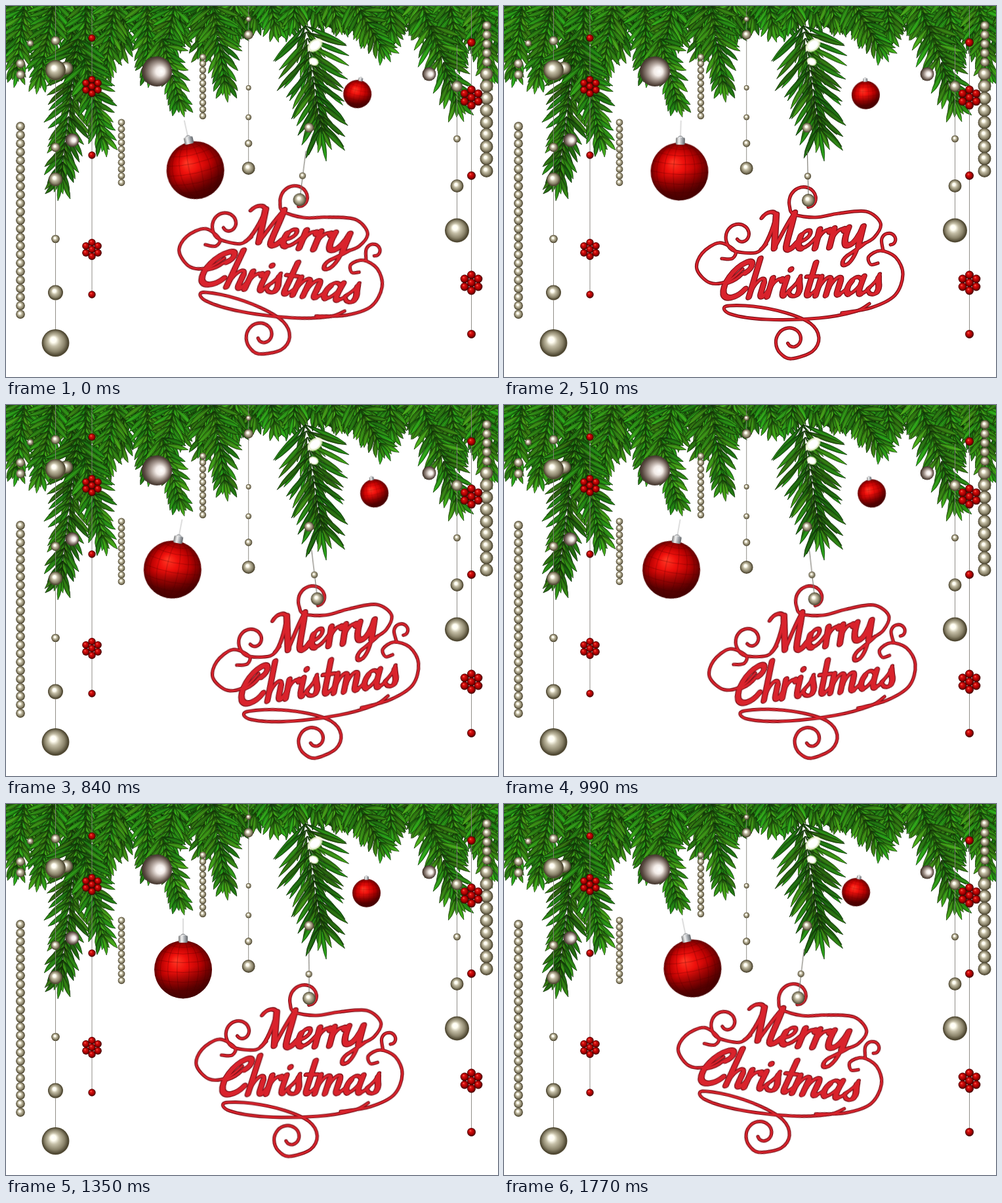
An HTML page with a canvas for the animation above (1800 ms loop, 750 by 567 pixels).

```html
<!DOCTYPE html>
<html lang="en">
<head>
<meta charset="utf-8">
<title>Merry Christmas</title>
<style>
html, body { margin: 0; width: 100%; height: 100%; overflow: hidden; background: #fff; }
canvas, svg { position: absolute; left: 0; top: 0; width: 750px; height: 567px; }

/* Each half of the swing advances in 30 ms steps */
.swing { animation: swing 1800ms steps(30) infinite; }
@keyframes swing {
  0%, 100% { transform: rotate(var(--from)); }
  50% { transform: rotate(var(--to)); }
}
#sign { --from: 8.5deg; --to: -6.5deg; transform-origin: 461.3px 186px; }
#bigBall { --from: -12.5deg; --to: 12.5deg; transform-origin: 270px 167px; }
#smallBall { --from: 12.5deg; --to: -12.5deg; transform-origin: 549.5px 72px; }

#lettering path { fill: none; stroke-linecap: round; stroke-linejoin: round; }
.curl { stroke-width: calc(2.8px + var(--edge)); }
.bold { stroke-width: calc(7px + var(--edge)); }
.thin { stroke-width: calc(4px + var(--edge)); }
.outline { --edge: 2.4px; stroke: #7d0e16; }
.face { --edge: 0px; stroke: #d9232c; }
</style>
</head>
<body>
<canvas id="fir" width="750" height="567"></canvas>
<svg viewBox="0 0 750 567" role="img" aria-label="Merry Christmas">
  <defs>
    <radialGradient id="pearl" cx=".5" cy=".5" r=".52" fx=".4" fy=".36">
      <stop offset="0" stop-color="#fff"/>
      <stop offset=".2" stop-color="#fffdf0"/>
      <stop offset=".4" stop-color="#c4bea6"/>
      <stop offset=".7" stop-color="#8a836a"/>
      <stop offset=".92" stop-color="#4a432e"/>
      <stop offset="1" stop-color="#766f57"/>
    </radialGradient>
    <radialGradient id="rose" cx=".5" cy=".5" r=".52" fx=".66" fy=".5">
      <stop offset="0" stop-color="#fff"/>
      <stop offset=".28" stop-color="#f3ece8"/>
      <stop offset=".55" stop-color="#a89a92"/>
      <stop offset=".85" stop-color="#57483f"/>
      <stop offset="1" stop-color="#3b2e27"/>
    </radialGradient>
    <radialGradient id="berry" cx=".5" cy=".5" r=".52" fx=".36" fy=".32">
      <stop offset="0" stop-color="#ff7660"/>
      <stop offset=".25" stop-color="#dc1010"/>
      <stop offset=".65" stop-color="#a20000"/>
      <stop offset="1" stop-color="#2c0000"/>
    </radialGradient>
    <radialGradient id="bauble" cx=".5" cy=".5" r=".52" fx=".38" fy=".34">
      <stop offset="0" stop-color="#ff3a26"/>
      <stop offset=".3" stop-color="#ee100c"/>
      <stop offset=".65" stop-color="#bb0202"/>
      <stop offset="1" stop-color="#5e0000"/>
    </radialGradient>
    <linearGradient id="dusk" x1=".35" y1="0" x2=".6" y2="1">
      <stop offset=".5" stop-color="#300" stop-opacity="0"/>
      <stop offset=".85" stop-color="#300" stop-opacity=".65"/>
    </linearGradient>
    <linearGradient id="cap">
      <stop offset="0" stop-color="#777"/>
      <stop offset=".35" stop-color="#f4f4f4"/>
      <stop offset=".65" stop-color="#a9adb2"/>
      <stop offset="1" stop-color="#63666a"/>
    </linearGradient>
    <radialGradient id="glow">
      <stop offset=".55" stop-color="#fff"/>
      <stop offset=".8" stop-color="#f6fbd8" stop-opacity=".85"/>
      <stop offset="1" stop-color="#dff0a8" stop-opacity="0"/>
    </radialGradient>
    <g id="ball">
      <path d="M-4 -50a4 4 0 1 1 8 0" fill="none" stroke="#9a9da0" stroke-width="1.5"/>
      <circle r="44" fill="url(#bauble)"/>
      <g id="facets" fill="none" stroke="#500" stroke-opacity=".35"></g>
      <circle r="44" fill="url(#dusk)"/>
      <rect x="-7" y="-52" width="14" height="11" rx="2" fill="url(#cap)"/>
    </g>
    <g id="lettering"></g>
  </defs>

  <g id="strings" stroke="#85837c" stroke-width=".9"></g>
  <g id="beads"></g>
  <ellipse cx="471" cy="60" rx="14" ry="9.5" transform="rotate(-38 471 60)" fill="url(#glow)"/>
  <ellipse cx="469" cy="85" rx="8.5" ry="6.5" transform="rotate(25 469 85)" fill="url(#glow)"/>

  <g id="bigBall" class="swing">
    <path d="M270 175V201" stroke="#bbb"/>
    <use href="#ball" x="270" y="253"/>
  </g>
  <g id="smallBall" class="swing">
    <use href="#ball" transform="translate(549.5 136) scale(.488)"/>
  </g>
  <g id="sign" class="swing">
    <use href="#lettering" class="outline"/>
    <use href="#lettering" class="face"/>
    <path d="M462.4 222L464 290" stroke="#77756c" stroke-width="1.1"/>
    <circle cx="463" cy="260" r="5.2" fill="url(#pearl)"/>
    <circle cx="464" cy="297" r="10" fill="url(#pearl)"/>
  </g>
</svg>
<script>
const svgNS = 'http://www.w3.org/2000/svg';
const byId = id => document.getElementById(id);
const rad = deg => deg * Math.PI / 180;

function add(parent, tag, attrs) {
  const el = document.createElementNS(svgNS, tag);
  for (const key in attrs) el.setAttribute(key, attrs[key]);
  parent.append(el);
  return el;
}

// --- Fir: seeded random numbers keep the branches identical on every load
let seed = 77;
function rand() {
  seed = (seed * 1664525 + 1013904223) >>> 0;
  return seed / 4294967296;
}
const spread = n => (rand() - .5) * 2 * n;
const ctx = byId('fir').getContext('2d');

function needle(x, y, angle, len, width, light) {
  const hue = 106 + spread(7);
  const tone = k => `hsl(${hue} 73% ${Math.round(light * k)}%)`;
  const bend = spread(3);
  ctx.save();
  ctx.translate(x, y);
  ctx.rotate(angle);
  const shade = ctx.createLinearGradient(0, 0, len, 0);
  shade.addColorStop(0, tone(.5));
  shade.addColorStop(.45, tone(.95));
  shade.addColorStop(1, tone(1.15));
  ctx.fillStyle = shade;
  ctx.strokeStyle = tone(.42);
  ctx.lineWidth = .7;
  ctx.beginPath();
  ctx.moveTo(0, 0);
  ctx.quadraticCurveTo(len * .6, bend - width, len, 0);
  ctx.quadraticCurveTo(len * .6, bend + width, 0, 0);
  ctx.fill();
  ctx.stroke();
  ctx.strokeStyle = tone(1.45);
  ctx.beginPath();
  ctx.moveTo(len * .2, 0);
  ctx.quadraticCurveTo(len * .6, bend, len * .95, 0);
  ctx.stroke();
  ctx.restore();
}

function branch(x0, y0, x1, y1, len, light) {
  const dir = Math.atan2(y1 - y0, x1 - x0);
  const rows = Math.ceil(Math.hypot(x1 - x0, y1 - y0) / 10);
  for (let i = 0; i <= rows; i++) {
    const t = i / rows;
    const x = x0 + (x1 - x0) * t, y = y0 + (y1 - y0) * t;
    for (const side of [-1, 1]) {
      const open = 1 - .5 * t + spread(.15);
      const size = len * (1.1 - .35 * t) * (.9 + rand() * .2);
      needle(x, y, dir + side * open, size, 7, light + spread(5));
      needle(x, y, dir + side * open * .45, size * .75, 6, light + 2 + spread(5));
    }
  }
  needle(x1, y1, dir, len * .8, 6, light + 4);
}

// Fringe along the top: deep at both ends, shallow around x = 475
const fringe = x => Math.min(98, 22 + 75 * ((x - 475) / 260) ** 2);
for (const [depth, step, light] of [[.3, 30, 18], [.65, 40, 25], [1, 46, 29]])
  for (let x = -15; x < 780; x += step)
    branch(x, -25, x + (x - 400) * .05 + spread(12), fringe(x) * depth + spread(9), 40, light);

// Boughs that hang below the fringe
branch(110, 50, 84, 258, 50, 25);
branch(120, 80, 146, 198, 42, 29);
branch(238, 50, 264, 142, 36, 28);
branch(316, 0, 333, 114, 42, 28);
branch(456, 30, 480, 185, 66, 26);
branch(530, -10, 570, 58, 40, 28);
branch(648, 30, 686, 142, 46, 29);

// --- Bead strings
const bead = (cx, cy, r, kind = 'pearl') =>
  add(byId('beads'), 'circle', { cx, cy, r, fill: `url(#${kind})` });
const string = (x, y1, y2) => add(byId('strings'), 'line', { x1: x, y1, x2: x, y2 });

function strand(x, top, bottom, gap, r) {
  for (let y = top; y <= bottom; y += gap) bead(x, y, r);
}
function hang(x, top, pearls) {
  const ys = Object.keys(pearls).map(Number);
  string(x, top, Math.max(...ys));
  for (const y of ys) bead(x, y, pearls[y]);
}
function flower(x, y, r) {
  for (let a = 90; a < 450; a += 60)
    bead(x + Math.cos(rad(a)) * r * 1.85, y + Math.sin(rad(a)) * r * 1.85, r, 'berry');
  bead(x, y, r, 'berry');
}
function redString(x, scale) {
  const r = 5.7 * scale;
  string(x, 0, 441 * scale);
  for (const y of [49, 228, 441]) bead(x, y * scale, r, 'berry');
  for (const y of [123, 372]) flower(x, y * scale, r);
}

strand(22, 184, 472, 13.05, 6.9);
strand(22, 88, 106, 17, 7);
strand(300, 78, 170, 10, 5.2);
strand(176, 178, 271, 10.2, 5.4);
strand(733, 30, 90, 14, 7);
strand(732.5, 104, 253, 18.5, 10);
bead(92, 95, 10);
bead(37, 57, 5);
bead(462, 186, 7.5);
hang(75.5, 0, { 53: 7, 98: 15.5, 216: 7, 265: 10.5, 356: 6.3, 438: 11.5, 515: 21 });
hang(369.7, 0, { 20: 4, 44: 7.2, 125: 4, 170: 4.5, 210: 5.7, 248: 10 });
hang(687.5, 60, { 123: 8.5, 203: 5.5, 275: 10, 343: 18.5 });
bead(230, 100, 23, 'rose');
bead(101, 205, 10.5, 'rose');
bead(645, 104, 10.5, 'rose');
redString(131, 1);
redString(709.5, 1.137);

// --- Bauble facets: meridians and sagging parallels
for (let a = 12; a < 90; a += 20)
  add(byId('facets'), 'ellipse', { rx: 44 * Math.sin(rad(a)), ry: 44 });
for (let a = -60; a <= 60; a += 20) {
  const x = 44 * Math.cos(rad(a)), y = 44 * Math.sin(rad(a));
  add(byId('facets'), 'path', { d: `M${-x} ${y}Q0 ${y + 9} ${x} ${y}` });
}

// --- Lettering
const ink = byId('lettering');

// Smooth curve through key points
function smooth(points) {
  const at = i => points[Math.max(0, Math.min(points.length - 1, i))];
  let d = 'M' + points[0];
  for (let i = 0; i < points.length - 1; i++) {
    const [p, a, b, n] = [at(i - 1), at(i), at(i + 1), at(i + 2)];
    const c1 = a.map((v, k) => v + (b[k] - p[k]) / 6);
    const c2 = b.map((v, k) => v - (n[k] - a[k]) / 6);
    d += `C${c1} ${c2} ${b}`;
  }
  return d;
}
// Opens anticlockwise from radius r0 to r1
function spiral(cx, cy, r0, r1, from, to) {
  const n = 10;
  return Array.from({ length: n + 1 }, (_, i) => {
    const a = rad(from + (to - from) * i / n), r = r0 + (r1 - r0) * i / n;
    return [cx + r * Math.cos(a), cy + r * Math.sin(a)];
  });
}
const swash = (...points) => add(ink, 'path', { class: 'curl', d: smooth(points) });

swash(...spiral(460, 297, 11, 28, 70, -230), [475, 323], [510, 317], [552, 314], [574, 332], [564, 354], [543, 366]);
swash(...spiral(360, 351, 7, 25, 130, -250), [384, 377], [400, 364]);
swash([332, 386], [348, 386], [352, 374], [328, 362], [302, 378], [294, 402], [314, 423], [342, 420], [364, 402]);
swash(...spiral(588, 358, 7, 13, 80, -200), [578, 374]);
swash([570, 393], [559, 395], [556, 383], [574, 374], [597, 384], [608, 410], [596, 442], [560, 461], [515, 469]);
swash(...spiral(438, 511, 7, 28, 140, -270), [470, 528], [480, 507], [467, 485], [430, 469], [380, 459],
  [338, 459], [346, 471], [400, 479], [480, 477], [535, 467], [557, 455]);

// Letters stand on y = 0 with an x-height of 28; w is the advance
const hump = x => `M${x} -8c2 -12 8 -20 13 -18c4 2 3 10 3 16`;
const glyphs = {
  M: { w: 48, bold: 'M9 -53L18 -4M34 -54C35 -36 33 -16 34 -6C35 1 41 2 48 -10',
       thin: 'M-10 -50C-6 -59 4 -60 9 -53C10 -34 6 -10 0 -4M18 -4C24 -24 28 -42 34 -54' },
  e: { w: 25, bold: 'M3 -20C1 -10 2 -2 8 -1',
       thin: 'M0 -10C12 -12 18 -20 14 -26C8 -30 1 -20 2 -10C3 3 14 2 25 -16' },
  r: { w: 20, bold: 'M2 -27V0M16 -25l1 2', thin: 'M3 -12C5 -22 11 -28 17 -24' },
  y: { w: 30, bold: 'M2 -27C0 -14 0 0 8 -1C15 -2 21 -16 22 -27L22 0',
       thin: 'M22 -8C22 8 20 20 14 26C6 32 2 22 10 14C18 8 24 4 30 -2' },
  C: { w: 0, bold: 'M-10 -36C0 -42 -2 -56 -13 -51C-30 -43 -39 -20 -33 -6C-28 4 -12 2 -3 -12',
       thin: 'M-30 -22C-24 -24 -18 -28 -14 -34' },
  h: { w: 31, bold: 'M6 -56V0M22 -20V-6C22 -1 24 0 26 -1', thin: hump(7) + 'M26 -1Q29 -3 32 -12' },
  i: { w: 11, bold: 'M3 -27C3 -16 1 -1 6 -1M5 -39h.1', thin: 'M6 -1L13 -8' },
  s: { w: 20, bold: 'M11 -24C12 -16 18 -10 15 -3',
       thin: 'M0 -8C8 -16 11 -22 11 -29C12 -18 20 -10 16 -3C13 2 5 1 2 -4' },
  t: { w: 20, bold: 'M8 -48V-6C8 -1 10 0 12 -1', thin: 'M0 -28H17M12 -1Q16 -2 21 -10' },
  m: { w: 43, bold: 'M2 -27V0M17 -21V0M32 -21V-6C32 -1 34 0 36 -1',
       thin: hump(3) + hump(18) + 'M36 -1Q39 -2 45 -9' },
  a: { w: 33, bold: 'M22 -26C21 -14 19 0 25 -1M6 -20C1 -12 2 -3 7 -1',
       thin: 'M19 -22C13 -30 3 -24 2 -10C2 2 11 3 20 -14M25 -1Q30 -2 35 -9' }
};
function write(word, transform) {
  const line = add(ink, 'g', { transform });
  let x = 0;
  for (const char of word) {
    const { w, ...strokes } = glyphs[char];
    for (const kind in strokes)
      add(line, 'path', { class: kind, d: strokes[kind], transform: `translate(${x})` });
    x += w;
  }
}
write('Merry', 'translate(391 376) rotate(-4) skewX(-18) scale(1.11 1.04)');
write('Christmas', 'translate(367 445) rotate(-1.4) skewX(-18) scale(1.04)');
</script>
</body>
</html>
```
